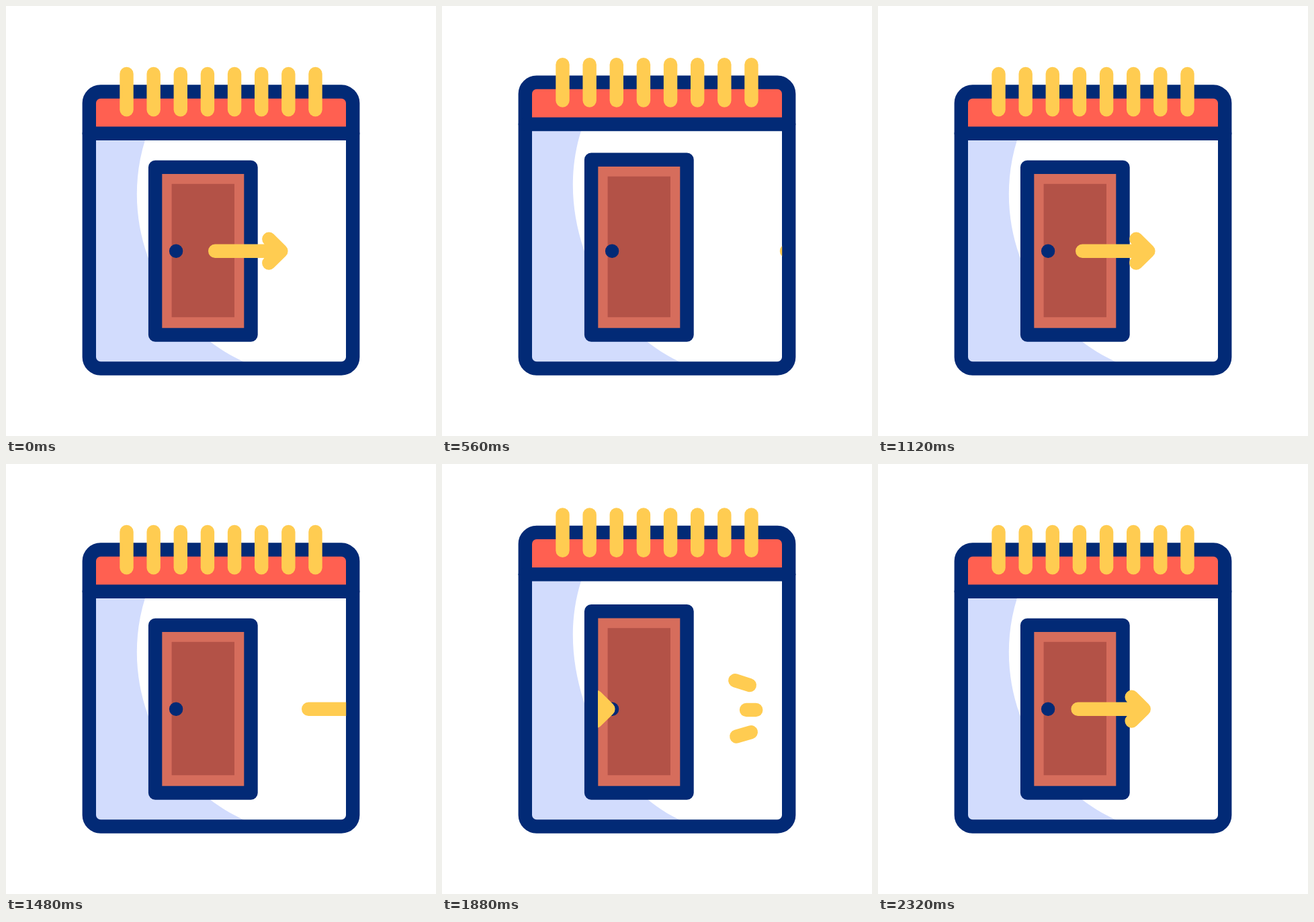
Animation, 640 px wide and 640 px high, one loop 2360 ms. Source, as an HTML page:

```html
<!DOCTYPE html>
<html lang="en">
<head>
<meta charset="utf-8">
<title>Calendar exit</title>
<style>
  html, body { margin: 0; width: 100%; height: 100%; overflow: hidden; background: #fff; }
  svg { display: block; width: 100%; height: 100%; }
  .line { fill: none; stroke: #022a76; stroke-width: 20.4; stroke-linecap: round; stroke-linejoin: round; }
  .gold { fill: none; stroke: #ffcc51; stroke-width: 20.4; stroke-linecap: round; stroke-linejoin: round; }
</style>
</head>
<body>
<svg viewBox="0 0 640 640">
  <defs>
    <clipPath id="room"><rect x="232" y="300" width="274.2" height="130"/></clipPath>
    <clipPath id="page"><rect id="pageBox" x="124" width="392" rx="17"/></clipPath>
  </defs>
  <g clip-path="url(#page)">
    <path id="shade" fill="#d2dcfd"/>
    <rect id="header" x="124" width="392" height="62" fill="#ff6051"/>
  </g>
  <rect id="frame" class="line" x="123.8" width="392.4" rx="17"/>
  <path id="divider" class="line"/>
  <g id="rings" class="gold"></g>
  <rect id="door" x="222.1" width="142.4" fill="#d66d5c" stroke="#022a76" stroke-width="20.4" stroke-linejoin="round"/>
  <rect id="panel" x="246.6" width="93.4" fill="#b35247"/>
  <circle cx="253.1" cy="364.7" r="10.2" fill="#022a76"/>
  <g clip-path="url(#room)">
    <path id="arrow" class="gold" d="M311.2 364.7H409M391.3 346.8L409.4 364.7L391.3 382.6"/>
  </g>
  <g id="burst" class="gold"></g>
</svg>
<script>
const LOOP = 2360, STEP = 40, RISE = 25.6;
const $ = id => document.getElementById(id);
const clamp = v => Math.max(0, Math.min(1, v));
const smooth = v => (1 - Math.cos(Math.PI * clamp(v))) / 2;
const mix = (a, b, p) => a + (b - a) * p;

function addPath(parent, d = "") {
  const el = document.createElementNS("http://www.w3.org/2000/svg", "path");
  el.setAttribute("d", d);
  return parent.appendChild(el);
}

for (let i = 0; i < 8; i++) addPath($("rings"), `M${179.5 + i * 40.14} 101V154.3`);

// Left end and right end of each spark line
const sparks = [
  [436.3, 322.2, 474, 334.3],
  [453, 366, 478, 366],
  [438.3, 405.5, 476, 394.5]
].map(ends => ({ ends, el: addPath($("burst")) }));

// Time and horizontal shift of the arrow; it jumps back while hidden
const travel = [
  [0, 0], [320, 115], [580, 209], [580, -228], [760, -154], [1120, -7],
  [1480, 139], [1660, 212], [1660, -236], [1880, -162], [2240, -41], [2360, 0]
];

function arrowShift(t) {
  const i = travel.findIndex(k => k[0] > t);
  const [t0, x0] = travel[i - 1], [t1, x1] = travel[i];
  return mix(x0, x1, (t - t0) / (t1 - t0));
}

function setSpan(id, top, bottom) {
  $(id).setAttribute("y", top);
  $(id).setAttribute("height", bottom - top);
}

function stretch(t) {
  const p = t % 1120;
  return t >= 2240 ? 0 : smooth((p - 360) / 380) * (1 - smooth((p - 780) / 320));
}

function drawBurst(t) {
  const p = t % (LOOP / 2);
  const from = 1 - clamp((p - 560) / 80);
  const to = 1 - clamp((p - 640) / 140);
  for (const { ends: [x0, y0, x1, y1], el } of sparks) {
    el.setAttribute("d", from < to
      ? `M${mix(x0, x1, from)} ${mix(y0, y1, from)}L${mix(x0, x1, to)} ${mix(y0, y1, to)}` : "");
  }
}

function draw(t) {
  const s = stretch(t), up = RISE * s, doorUp = 20.6 * s;
  setSpan("pageBox", 127.5 - up, 539.5);
  setSpan("frame", 127.5 - up, 539.5);
  $("header").setAttribute("y", 128 - up);
  $("divider").setAttribute("d", `M123.8 ${189.8 - up}H516.2`);
  $("rings").setAttribute("transform", `translate(0 ${-up})`);
  $("shade").setAttribute("d",
    `M124 ${190 - up}H210L207 ${199.8 - up}C199 ${225 - up} 194.8 ${252 - up} 194.8 ${280 - up}` +
    `C194.8 ${386 - up} 256.5 484.5 353.5 529.4V540H124Z`);
  setSpan("door", 239.9 - doorUp, 489.5);
  setSpan("panel", 264.8 - doorUp, 463.2);
  $("arrow").setAttribute("transform", `translate(${arrowShift(t)} 0)`);
  drawBurst(t);
}

const start = performance.now();
function tick() {
  const t = (performance.now() - start) % LOOP;
  draw(Math.floor(t / STEP) * STEP);
  requestAnimationFrame(tick);
}
tick();
</script>
</body>
</html>
```
